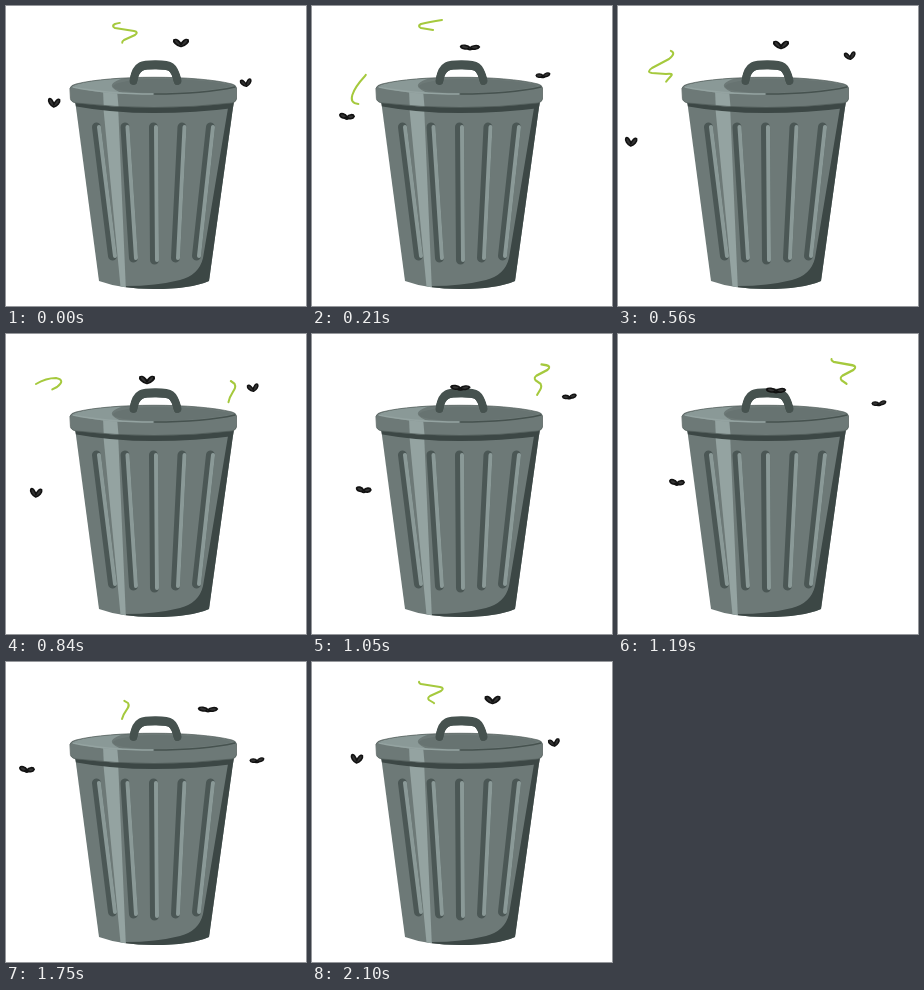
Recreate the animation shown at these times as an HTML page. Size 300 by 300 pixels, loop 2.17 s.

```html
<!DOCTYPE html>
<html lang="en">
<head>
<meta charset="utf-8">
<title>Smelly bin</title>
<style>
html, body { margin: 0; width: 100%; height: 100%; overflow: hidden; background: #fff; }
svg { display: block; width: 100vw; height: 100vh; }
.line { fill: none; stroke-linecap: round; stroke-linejoin: round; }
</style>
</head>
<body>
<svg viewBox="0 0 300 300">
  <defs>
    <clipPath id="shell"><path d="M69 94 L93 275 Q115 283 148 283 Q184 283 203 275 L228 94 Z"/></clipPath>
    <clipPath id="rim"><path id="rimShape" d="M64 82 Q65 79 70 78 C105 69 191 69 226 78 Q230 79 230.5 82 L230.5 93 Q230 96 226 97 Q148 106 70 97 Q65 96 64.5 93 Z"/></clipPath>
  </defs>

  <g clip-path="url(#shell)">
    <rect x="60" y="90" width="180" height="200" fill="#6d7977"/>
    <path d="M97 98 H112 L120 286 H115 Z" fill="#94a3a1"/>
    <path d="M230 94 L222 102 L197 252 Q193 269 174 274 Q150 280 120 280 L120 290 H210 Z" fill="#3c4745"/>
    <path d="M66 96 Q148 106 231 96 L228 102 Q190 107 148 107 Q105 107 68 100 Z" fill="#3c4745"/>
  </g>
  <g id="ribs"></g>

  <use href="#rimShape" fill="#6d7977"/>
  <g clip-path="url(#rim)">
    <path d="M97 84 H111 L113 106 H98 Z" fill="#94a3a1"/>
    <path d="M67 80 C95 69 200 69 230 80 C200 90 95 90 67 80 Z" fill="#6d7977"/>
    <path d="M67 80 Q85 73 118 72 Q102 77 107 82 Q112 87 122 88 Q86 87 67 80 Z" fill="#8a9997"/>
    <path d="M107 80 Q113 74 148 73 Q205 73 226 80 Q200 86 148 87 Q106 86 107 80 Z" fill="#677371"/>
    <path d="M67 81 Q100 88 148 88" class="line" stroke="#94a3a1" stroke-width="1.3"/>
    <path d="M148 88 Q198 88 229 81" class="line" stroke="#46524f" stroke-width="1.3"/>
  </g>
  <use href="#rimShape" class="line" stroke="#4f5b58" stroke-width=".7"/>

  <g class="line">
    <path id="grip" d="M127.5 75 C130 59 138 59.5 150 59.5 C165 59.5 168 61 171.5 75" stroke="#46524f" stroke-width="7.5"/>
    <use href="#grip" stroke="#6d7977" stroke-width="6"/>
    <use href="#grip" y="-1.5" stroke="#94a3a1" stroke-width="1.6"/>
  </g>

  <g id="plumes" class="line" stroke="#a5c93d" stroke-width="2"></g>
  <g id="flies" fill="#333" stroke="#111" stroke-width="1.8" stroke-linejoin="round"></g>
</svg>
<script>
const STEP = 70, COUNT = 31;
const $ = id => document.getElementById(id);
const clamp = v => Math.min(1, Math.max(0, v));

function addPath(parent, attrs) {
  const el = document.createElementNS('http://www.w3.org/2000/svg', 'path');
  for (const k in attrs) el.setAttribute(k, attrs[k]);
  return parent.appendChild(el);
}

// Five ribs fan out from the middle of the bin
for (let k = -2; k <= 2; k++) {
  const rib = (dx, width, color) => addPath($('ribs'), {
    d: `M${148 + 28.5 * k + dx} 121L${149 + 21 * k + dx} ${254 - 2 * Math.abs(k)}`,
    class: 'line', stroke: color, 'stroke-width': width
  });
  rib(-.5, 9, '#4b5755');
  rib(2, 4, '#8a9997');
}

// Scent lines grow from the bottom up and vanish the same way
const curl = 'M116 57C118 48 125 46 122 41L117 38Q115 36 118 34L129 29Q133 26 128 25L109 22Q105 20 109 18Q117 16 130 14';
const bigCurl = 'M47 98C34 98 40 84 53 70Q56 67 48 68L34 67Q28 66 34 62L51 53Q60 46 50 44Q40 44 30 50';
const plume = (d, start, transform = '') =>
  ({ start, el: addPath($('plumes'), { d, transform, pathLength: 1 }) });
const plumes = [
  plume(curl, 25),
  plume(curl, 12, 'translate(106.5 2.5) scale(1 1.15)'),
  plume(bigCurl, 2.3)
];

function drawPlume({ el, start }, step) {
  const age = (step - start + 3 + COUNT) % COUNT - 3;
  const head = 1 - (1 - clamp((age + 2) / 11)) ** 1.35;
  const tail = clamp(age / 12) ** 1.9;
  const shown = head - tail > .005;
  el.style.display = shown ? '' : 'none';
  if (!shown) return;
  el.setAttribute('stroke-dasharray', `${head - tail} 3`);
  el.setAttribute('stroke-dashoffset', -tail);
}

// Flies follow smooth closed paths through a few points
const knots = [0, 3, 8, 12, 17, 25];
const wingsUp = 'M0 4.5C-4 3-7-1-6-4C-4-6-1-2 0 2C1-2 4-6 6-4C7-1 4 3 0 4.5Z';
const wingsDown = 'M0 1C-2-3-7-3-8-1C-8 2-3 4 0 1C2 4 7 3 8 0C7-3 2-2 0 1ZM-3 2Q0 5 3 2';
const fly = (size, tilt, points) => ({ size, tilt, points, el: addPath($('flies'), {}) });
const flies = [
  fly('.9 .9', 4, [[48, 97], [35, 110], [13, 136], [30, 159], [59, 148], [21, 107]]),
  fly('1.15 .8', 0, [[175, 37], [158, 41], [163, 39], [141, 46], [158, 56], [202, 47]]),
  fly('.85 .75', -9, [[240, 77], [231, 69], [232, 50], [247, 54], [261, 69], [251, 98]])
];

function along(points, t) {
  const n = knots.length;
  const time = i => knots[(i + n) % n] + Math.floor(i / n) * COUNT;
  const at = i => points[(i + n) % n];
  let i = n - 1;
  while (knots[i] > t) i--;
  const span = time(i + 1) - time(i), s = (t - time(i)) / span, r = 1 - s;
  return [0, 1].map(k => {
    const slope = j => (at(j + 1)[k] - at(j - 1)[k]) / (time(j + 1) - time(j - 1)) * span;
    return at(i)[k] * (1 + 2 * s) * r * r + slope(i) * s * r * r
      + at(i + 1)[k] * s * s * (3 - 2 * s) - slope(i + 1) * s * s * r;
  });
}

function drawFly({ el, size, tilt, points }, step) {
  const [x, y] = along(points, step);
  el.setAttribute('d', step % 2 ? wingsDown : wingsUp);
  el.setAttribute('transform', `translate(${x} ${y}) rotate(${tilt}) scale(${size})`);
}

const begin = performance.now();
function tick() {
  const step = Math.floor((performance.now() - begin) / STEP) % COUNT;
  plumes.forEach(p => drawPlume(p, step));
  flies.forEach(f => drawFly(f, step));
  requestAnimationFrame(tick);
}
tick();
</script>
</body>
</html>
```
